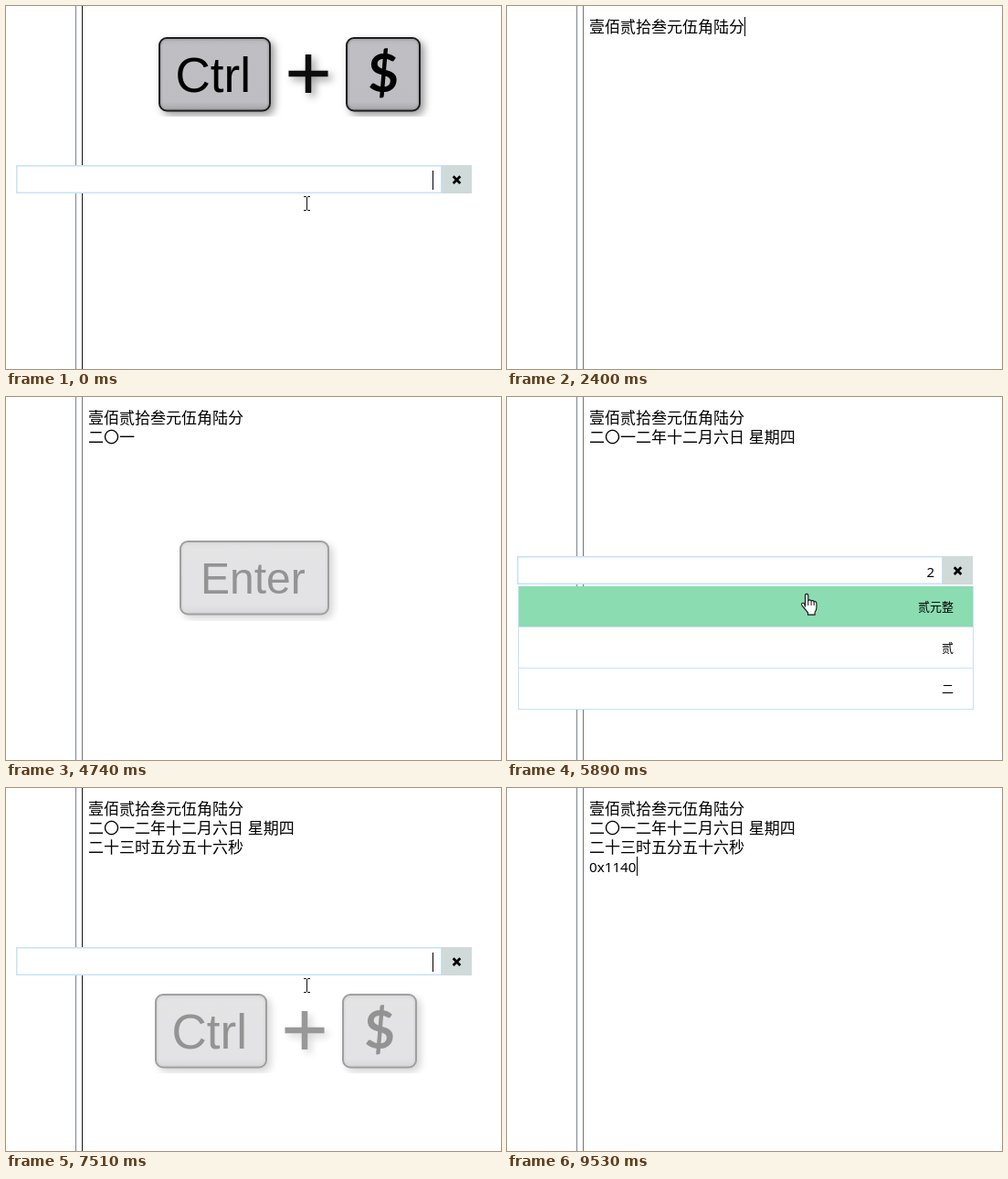
Recreate the animation shown at these times as an HTML page. Size 542 by 397 pixels, loop 9.63 s.

```html
<!DOCTYPE html>
<html lang="zh-CN">
<head>
<meta charset="utf-8">
<style>
  html, body { margin: 0; width: 100%; height: 100%; overflow: hidden; background: #fff; }
  svg { display: block; }
  .doc { font: 17px "Noto Sans CJK SC", "Noto Sans CJK", sans-serif; word-spacing: 1px; white-space: pre; }
  .row { font: 13px "Noto Sans CJK SC", "Noto Sans CJK", sans-serif; text-anchor: end; }
  .latin, .field { font: 15.2px "Noto Sans", "Open Sans", sans-serif; }
  .field { font-size: 15px; text-anchor: end; }
  .cap { font-family: "Liberation Sans", Arial, sans-serif; }
  .sign { font: 700 58px Lato, sans-serif; text-anchor: middle; }
</style>
</head>
<body>
<svg width="542" height="397" viewBox="0 0 542 397">
  <defs>
    <linearGradient id="face" x2="0" y2="1">
      <stop offset="0" stop-color="#b4b4b9"/>
      <stop offset=".1" stop-color="#bfbfc3"/>
      <stop offset=".88" stop-color="#bdbdc2"/>
      <stop offset="1" stop-color="#a4a4a9"/>
    </linearGradient>
    <filter id="shade" x="-20%" y="-20%" width="150%" height="150%">
      <feDropShadow dx="4" dy="4" stdDeviation="4" flood-color="#000" flood-opacity=".4"/>
    </filter>
    <clipPath id="enterClip"><rect x="-5" y="-4" width="179" height="92"/></clipPath>
    <clipPath id="comboClip"><rect x="-7" y="-6" width="307" height="93"/></clipPath>
  </defs>
  <rect x="76" width="1" height="397" fill="#7d8296"/>
  <rect id="edge" x="83" width="1" height="397"/>
  <g id="scene"></g>
</svg>
<script>
const LOOP = 9630, FADED = 0.42;
const scene = document.getElementById('scene');
const edge = document.getElementById('edge');

const MONEY = '壹佰贰拾叁元伍角陆分';
const DATE = '二〇一二年十二月六日 星期四';
const TIME = '二十三时五分五十六秒';
const HEX = '0x1140';
const TWO = ['贰元整', '贰', '二'];

const combo = (x, y, alpha = 1) => ({ draw: comboArt, x, y, alpha });
const enter = (x, y, alpha = 1) => ({ draw: enterArt, x, y, alpha });

// ask: empty field, type: field with suggestions, put: text going into the page
const ask = (doc, keys, beam = true) => ({ doc, keys, field: '', caret: true, beam });
const type = (doc, field, rows, keys, caret) => ({ doc, field, rows, keys, caret });
const put = (doc, keys) => ({ doc, keys, docCaret: !keys });

const one = [MONEY], two = [MONEY, DATE], three = [MONEY, DATE, TIME];

const steps = [
  [0, ask([], combo(167, 34))],
  [800, ask([], combo(167, 34, FADED), false)],
  [1000, type([], '1', ['壹元整', '壹', '一'])],
  [1130, type([], '12', ['壹拾贰元整', '壹拾贰', '一十二'])],
  [1280, type([], '123', ['壹佰贰拾叁元整', '壹佰贰拾叁', '一百二十三'])],
  [1480, type([], '123.56', [MONEY, '壹佰贰拾叁点伍陆', '一百二十三点五六'], enter(182, 70), true)],
  [2280, put([MONEY.slice(0, 3)], enter(182, 70, FADED))],
  [2400, put(one)],
  [2600, ask(one, combo(163, 225, FADED))],
  [3400, type(one, '2', TWO)],
  [3540, type(one, '20', ['贰拾元整', '贰拾', '二十'])],
  [3740, type(one, '2012-12', ['二〇一二年十二月', '贰零壹贰年壹拾贰月'])],
  [3940, type(one, '2012-12-6', [DATE, DATE.slice(0, 10)], enter(190, 309))],
  [4740, put([MONEY, DATE.slice(0, 3)], enter(190, 157, FADED))],
  [4890, put(two)],
  [5090, ask(two, combo(163, 225, FADED))],
  [5890, type(two, '2', TWO)],
  [6090, type(two, '23', ['贰拾叁元整', '贰拾叁', '二十三'])],
  [6290, type(two, '23:5', ['二十三时五分', '下午 十一时五分'])],
  [6390, type(two, '23:5:56', [TIME, '下午 十一时五分五十六秒'], enter(211, 309))],
  [7190, put([MONEY, DATE, TIME.slice(0, 3)], enter(211, 309, FADED))],
  [7310, put(three)],
  [7510, ask(three, combo(163, 225, FADED))],
  [8310, type(three, '4', ['肆元整', '肆', '四'])],
  [8440, type(three, '44', ['肆拾肆元整', '肆拾肆', '四十四'])],
  [8590, type(three, '4416x', [HEX], enter(250, 75))],
  [9390, put([...three, '0'], enter(250, 93, FADED))],
  [9530, put([...three, HEX])]
];

const rect = (x, y, w, h, fill) =>
  `<rect x="${x}" y="${y}" width="${w}" height="${h}" fill="${fill}"/>`;
const text = (cls, x, y, s, extra = '') =>
  `<text class="${cls}" x="${x}" y="${y}" ${extra}>${s}</text>`;

const keycap = (x, w) =>
  `<rect x="${x + 1}" y="1" width="${w - 2}" height="79.5" rx="8" fill="url(#face)"
    stroke="#1b1b1d" stroke-width="2" filter="url(#shade)"/>
  <rect x="${x + 3}" y="3" width="${w - 6}" height="75.5" rx="6" fill="none"
    stroke="#98989d" stroke-width="1.6" opacity=".5"/>`;

function enterArt() {
  return `<g clip-path="url(#enterClip)">${keycap(0, 164)}</g>` +
    text('cap', 23, 58, 'Enter', 'font-size="48"');
}

function comboArt() {
  return `<g clip-path="url(#comboClip)">${keycap(0, 123)}${keycap(205, 82)}
    <path d="M142.5 40H185.5M164 19V61" stroke="#080808" stroke-width="6.5" filter="url(#shade)"/></g>` +
    text('cap', 18.5, 60, 'Ctrl', 'font-size="53"') +
    text('sign', 246, 60, '$');
}

function fieldArt(s) {
  const mark = s.caret ? rect(467, 180, 1, 21, '#000') : '';
  return rect(11, 174, 467, 31, '#c8e1fa') + rect(12.5, 175.5, 463.5, 28, '#fff') +
    rect(477, 174, 33, 31, '#cfdad9') +
    '<path d="M489.7 186.3l7.6 7.6m0-7.6l-7.6 7.6" stroke="#000" stroke-width="2.8"/>' +
    text('field', 468, 196.5, s.field) + mark;
}

function listArt(rows) {
  const body = rows.map((r, i) => {
    const y = 207 + 45 * i;
    return rect(13, y, 497, 44, i ? '#fff' : '#8bdcb1') +
      text('row', 489, y + 27, r);
  }).join('');
  return rect(12, 207, 499, rows.length * 45, '#c8e1fa') + body;
}

const BEAM = `<path d="M326 208.5h2.5l1 1l1-1h2.5M329.5 209v14M326 223.5h2.5l1-1l1 1h2.5"
  fill="none" stroke="#111"/>`;
const HAND = `<path d="M326.5 229.5V217q0-1.6 1.6-1.6T329.8 217v6.2q.2-1.3 1.6-1.3t1.7 1.6
  q.3-1 1.6-.9t1.5 1.6q.4-.8 1.5-.5t1.2 1.7v5q0 2.6-1.8 5v2.7h-7.6v-2.3l-6-7.2
  q-1.6-2.1-.4-3t2.6.6z" fill="#fff" stroke="#111" stroke-width="1.1"/>
  <path d="M329.8 223v5M333.1 223.5v4.5M336.2 224.5v3.5" stroke="#111" fill="none"/>`;

function docArt(s) {
  const ends = [260, 316, 260, 142];
  const n = s.doc.length;
  const lines = s.doc.map((l, i) => text(i === 3 ? 'latin' : 'doc', 90, 29 + 21 * i, l)).join('');
  return lines + (s.docCaret ? rect(ends[n - 1], 21 * n - 9, 1, 21, '#000') : '');
}

function keysArt(k) {
  return `<g transform="translate(${k.x} ${k.y})" opacity="${k.alpha}">${k.draw()}</g>`;
}

function render(s) {
  edge.setAttribute('fill', s.field === '' ? '#15151c' : '#74747f');
  scene.innerHTML = docArt(s) +
    (s.field !== undefined ? fieldArt(s) : '') +
    (s.rows ? listArt(s.rows) + HAND : '') +
    (s.beam ? BEAM : '') +
    (s.keys ? keysArt(s.keys) : '');
}

let shown = -1;
const start = performance.now();
function tick() {
  const t = (performance.now() - start) % LOOP;
  let i = steps.length - 1;
  while (steps[i][0] > t) i--;
  if (i !== shown) render(steps[shown = i][1]);
  requestAnimationFrame(tick);
}
tick();
</script>
</body>
</html>
```
